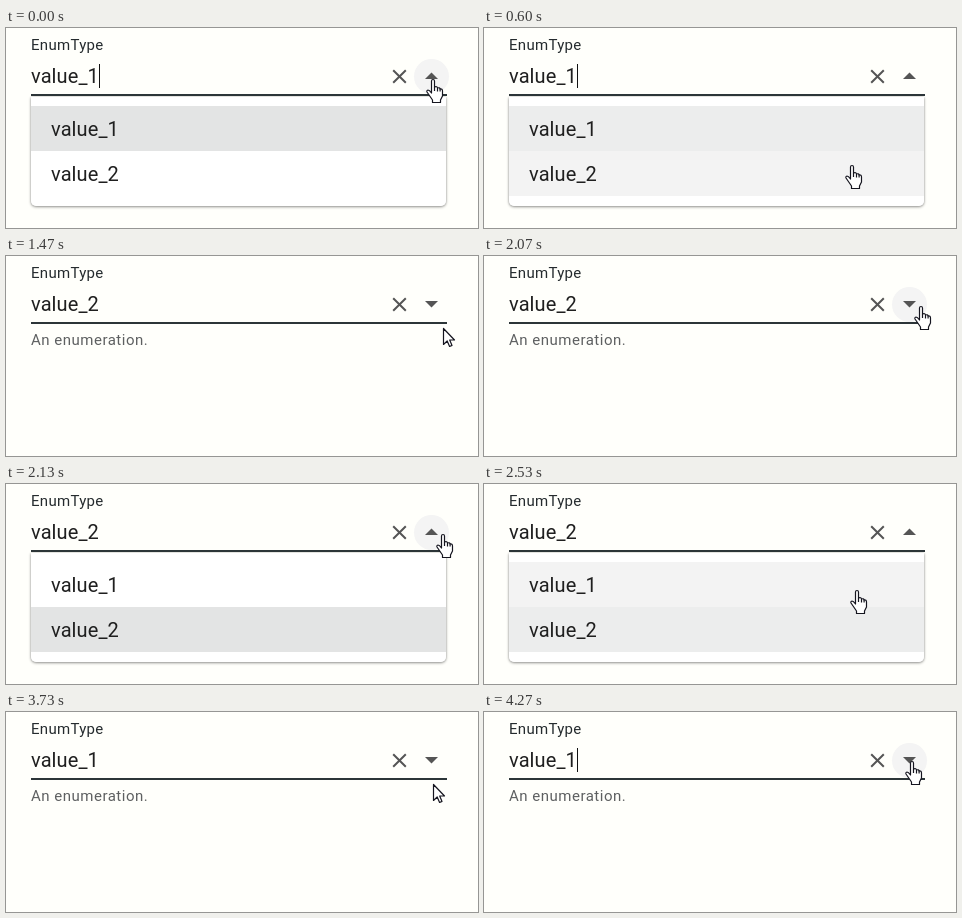
Recreate the animation shown at these times as an HTML page with a canvas. Size 472 by 200 pixels, loop 4340 ms.

```html
<!DOCTYPE html>
<html lang="en">
<head>
<meta charset="utf-8">
<title>Select field</title>
<style>
  html, body { margin: 0; width: 100%; height: 100%; overflow: hidden; background: #fffffb; }
  canvas { display: block; }
</style>
</head>
<body>
<canvas id="stage" width="472" height="200"></canvas>
<script>
const ctx = document.getElementById('stage').getContext('2d');
const LOOP = 4340, FPS = 15, LAST = 64;
const BUTTON = { x: 425.5, y: 48.5, r: 17.5 };
const ROW_TOP = 78, ROW_H = 45;
const ITEMS = ['value_1', 'value_2'];

// Pointer stops: step, x, y
const STOPS = [
  [0, 427, 51], [8, 368, 137], [14, 368, 137],
  [15, 375, 125], [22, 437, 72], [30, 437, 50], [32, 437, 50],
  [38, 373, 106], [49, 373, 106], [50, 373, 107],
  [57, 430, 70], [64, 428, 49]
];
const CARET_OFF = [[1, 9], [16, 23], [31, 50], [51, 58]];

const HAND = new Path2D('M5.5 14V2a1.5 1.5 0 0 1 3 0v6q2.6-1 3 1q2.2-.8 2.6 1q2.4-.4 2.4 2v5l-2 4v2.5h-8v-2.5l-5.5-8q-.6-1.6 1-2q1.4 0 3.5 3z');
const FINGERS = new Path2D('M8.5 8v4M11.5 9v3.5M14.1 10v2.5');
const ARROW = new Path2D('M.5.5V16.5L4.2 13L6.6 18.5L9 17.4L6.7 12H11.5z');

const within = (n, a, b) => n >= a && n < b;
const ease = p => p * p * (3 - 2 * p);

function pointerAt(n) {
  let i = 0;
  while (i < STOPS.length - 2 && n >= STOPS[i + 1][0]) i++;
  const [t0, x0, y0] = STOPS[i], [t1, x1, y1] = STOPS[i + 1];
  const p = ease(Math.min(1, (n - t0) / (t1 - t0)));
  return { x: Math.round(x0 + (x1 - x0) * p), y: Math.round(y0 + (y1 - y0) * p) };
}

function text(str, x, y, size, color, spacing) {
  ctx.font = size + 'px Roboto, Arial, sans-serif';
  ctx.letterSpacing = spacing + 'px';
  ctx.fillStyle = color;
  ctx.fillText(str, x, y);
}

function rect(x, y, w, h, color) {
  ctx.fillStyle = color;
  ctx.fillRect(x, y, w, h);
}

function drawField(value, open, caret, hover) {
  text('EnumType', 25, 22, 15, '#252b2e', 0.3);
  text(value, 25, 55, 20, '#1f1f1f', 0.1);
  if (caret) rect(93, 36, 1, 24, '#111');
  rect(25, 66, 416, 2, '#2c3538');

  if (hover) {
    ctx.fillStyle = '#f4f4f4';
    ctx.beginPath();
    ctx.arc(BUTTON.x, BUTTON.y, BUTTON.r, 0, Math.PI * 2);
    ctx.fill();
  }

  ctx.strokeStyle = '#555';
  ctx.lineWidth = 2;
  ctx.beginPath();
  ctx.moveTo(387.2, 42.2); ctx.lineTo(399.8, 54.8);
  ctx.moveTo(399.8, 42.2); ctx.lineTo(387.2, 54.8);
  ctx.stroke();

  const base = open ? 51 : 45, tip = open ? 44.5 : 51.5;
  ctx.fillStyle = '#555';
  ctx.beginPath();
  ctx.moveTo(419, base); ctx.lineTo(432, base); ctx.lineTo(425.5, tip);
  ctx.fill();
}

function panelShape(blur, dy, alpha) {
  ctx.shadowColor = `rgba(0,0,0,${alpha})`;
  ctx.shadowBlur = blur;
  ctx.shadowOffsetY = dy;
  ctx.fillStyle = '#fff';
  ctx.beginPath();
  ctx.roundRect(25, 69, 415, 109, [0, 0, 5, 5]);
  ctx.fill();
}

function drawMenu(selected, over) {
  ctx.save();
  ctx.beginPath();
  ctx.rect(0, 68, 472, 132);
  ctx.clip();
  panelShape(3, 1, 0.4);
  panelShape(2, 0, 0.2);
  ctx.restore();
  ITEMS.forEach((item, i) => {
    const y = ROW_TOP + i * ROW_H;
    let fill = null;
    if (i === selected) fill = over < 0 || over === i ? '#e3e4e4' : '#eceded';
    else if (i === over) fill = '#f3f3f3';
    if (fill) rect(25, y, 415, ROW_H, fill);
    text(item, 45, y + 30, 20, '#1f1f1f', 0.1);
  });
}

function drawPointer(p, hand) {
  ctx.save();
  ctx.translate(p.x - (hand ? 7 : 0), p.y);
  ctx.lineJoin = 'round';
  ctx.lineWidth = 1.2;
  ctx.fillStyle = '#fff';
  ctx.strokeStyle = '#15151f';
  const shape = hand ? HAND : ARROW;
  ctx.fill(shape);
  ctx.stroke(shape);
  if (hand) ctx.stroke(FINGERS);
  ctx.restore();
}

function render(t) {
  const n = Math.min(LAST, Math.floor((t + 4) * FPS / 1000));
  const open = n < 15 || within(n, 32, 50);
  const selected = within(n, 15, 50) ? 1 : 0;
  const caret = !CARET_OFF.some(([a, b]) => within(n, a, b));
  const p = pointerAt(n);
  const onButton = Math.hypot(p.x - BUTTON.x, p.y - BUTTON.y) < BUTTON.r;
  const row = Math.floor((p.y - ROW_TOP) / ROW_H);
  const over = open && row >= 0 && row < ITEMS.length ? row : -1;

  rect(0, 0, 472, 200, '#fffffb');
  drawField(ITEMS[selected], open, caret, onButton);
  if (open) drawMenu(selected, over);
  else text('An enumeration.', 25, 89, 15, '#5e6061', 0.5);
  drawPointer(p, onButton || over >= 0);
}

const start = performance.now();
function tick() {
  render((performance.now() - start) % LOOP);
  requestAnimationFrame(tick);
}
tick();
</script>
</body>
</html>
```
